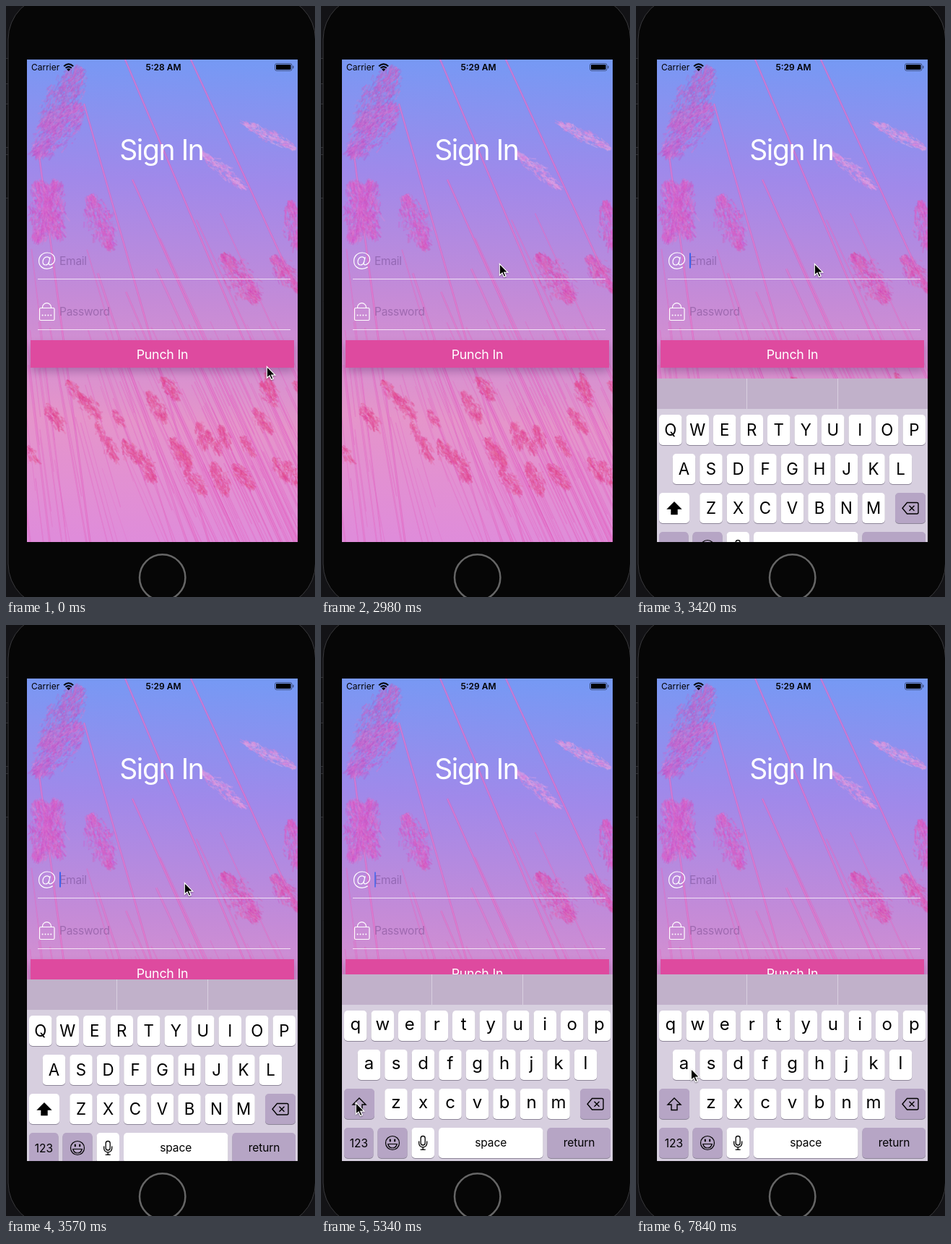
These frames come from a looping animation (428 by 817 pixels, 8 s). An HTML page with a canvas:

```html
<!DOCTYPE html>
<html lang="en">
<head>
<meta charset="utf-8">
<title>Sign In</title>
<style>
html, body { margin: 0; width: 100%; height: 100%; overflow: hidden; background: #060606; }
canvas { display: block; }
</style>
</head>
<body>
<canvas id="stage" width="428" height="817"></canvas>
<script>
const W = 428, H = 817, LOOP = 8000;
const SCREEN = { x: 29, y: 74, w: 375, h: 667 };
const stage = document.getElementById('stage').getContext('2d');
let ctx = stage;

let seed = 7;
const random = () => (seed = (seed * 16807) % 2147483647) / 2147483647;
const between = (a, b) => a + (b - a) * random();
const spread = r => (random() + random() - 1) * r;
const clamp = v => Math.max(0, Math.min(1, v));

function text(str, x, y, size, { weight = 400, color = '#000', align = 'left', spacing = 0 } = {}) {
  ctx.font = `${weight} ${size}px Inter, sans-serif`;
  ctx.letterSpacing = spacing + 'px';
  ctx.textAlign = align;
  ctx.fillStyle = color;
  ctx.fillText(str, x, y);
}

function box(x, y, w, h, r, fill) {
  ctx.beginPath();
  ctx.roundRect(x, y, w, h, r);
  ctx.fillStyle = fill;
  ctx.fill();
}

function line(path, color, width, fill) {
  const p = new Path2D(path);
  if (fill) { ctx.fillStyle = fill; ctx.fill(p); }
  ctx.strokeStyle = color;
  ctx.lineWidth = width;
  ctx.stroke(p);
}

function clipToScreen() {
  ctx.beginPath();
  ctx.rect(SCREEN.x, SCREEN.y, SCREEN.w, SCREEN.h);
  ctx.clip();
}

// Stems lean more the further right they start
function drawStem(x, y, length, width, alpha) {
  const lean = 0.12 + 0.34 * clamp((x - 40) / 140);
  const path = `M${x} ${y}L${x + length * lean} ${y + length}`;
  line(path, `rgba(221,88,186,${alpha})`, width);
  line(path, `rgba(238,150,220,${alpha})`, width * 0.35);
}

// A feathery head of soft hairs along an axis
function drawPlume(x, y, length, angle) {
  const pale = x > 260 && y < 260;
  const depth = clamp((y - 80) / 420);
  const hue = 290 + 40 * depth, sat = 50 + 22 * depth, light = pale ? 74 : 62;
  const width = length * (pale ? 0.13 : 0.3);
  const dx = Math.cos(angle), dy = Math.sin(angle);
  for (let i = 0; i < length * width / 3; i++) {
    const u = random();
    const side = spread(width) * (0.3 + 0.7 * Math.sin(Math.PI * u));
    const px = x + dx * length * u - dy * side, py = y + dy * length * u + dx * side;
    const reach = between(2, 8);
    const path = `M${px} ${py}l${dx * reach + spread(4)} ${dy * reach + spread(4)}`;
    line(path, `hsla(${hue + spread(10)},${sat}%,${light + spread(11)}%,.32)`, between(1, 2.6));
  }
}

function drawMeadow() {
  const { x, y, w, h } = SCREEN;
  const sky = ctx.createLinearGradient(x + w * 0.55, y, x + w * 0.45, y + h);
  ['#7699f4', '#a089ea', '#c58bd7', '#e595ca', '#df8cda'].forEach((c, i) => sky.addColorStop(i / 4, c));
  ctx.fillStyle = sky;
  ctx.fillRect(x, y, w, h);

  for (let i = 0; i < 150; i++) drawStem(between(-40, 390), between(430, 660), between(60, 280), between(0.6, 1.8), 0.36);
  for (let i = 0; i < 14; i++) drawStem(between(20, 310), between(270, 500), 480, between(1.5, 4), 0.4);
  for (const [sx, sy] of [[165, 74], [256, 74], [108, 135], [175, 240], [45, 200]]) drawStem(sx, sy, 670, 2.6, 0.55);

  // x, y, length, angle
  [
    [105, 84, 98, 2.1], [105, 135, 95, 2.3], [72, 240, 88, 1.9], [42, 240, 85, 1.2], [116, 260, 78, 1.2],
    [402, 198, 80, 3.6], [268, 200, 78, 0.7], [393, 268, 65, 1.4], [298, 342, 80, 0.92], [368, 345, 60, 0.9]
  ].forEach(p => drawPlume(...p));
  for (let i = 0; i < 26; i++) {
    drawPlume(x + w * (i * 0.618 % 1) ** 0.8, between(500, 650), between(24, 50), between(0.8, 1.3));
  }
}

function drawPhone() {
  ctx.fillStyle = '#131316';
  ctx.fillRect(0, 0, W, H);
  for (const [y, h] of [[72, 35], [135, 60], [205, 60]]) {
    box(-4, y, 9, h, 1, '#0d0d0f');
    line(`M0 ${y}.5H4M0 ${y + h}.5H4`, '#333336', 1);
  }
  box(3, -14, 425.5, 845, 60, '#060606');
  ctx.strokeStyle = '#39393c';
  ctx.lineWidth = 1;
  ctx.stroke();
  line('M185 790a31.7 31.7 0 1 0 63.4 0a31.7 31.7 0 1 0 -63.4 0', '#666', 2.5);
}

function drawStatusIcons() {
  line('M80.2 83.2Q86.7 77.4 93.2 83.2M82.6 85.8Q86.7 82.2 90.8 85.8', '#000', 2);
  line('M84.4 87.4Q86.7 85.6 89 87.4L86.7 90Z', '#000', 0.4, '#000');
  ctx.beginPath();
  ctx.roundRect(372.5, 79.5, 23.5, 10, 2.5);
  ctx.strokeStyle = 'rgba(0,0,0,.45)';
  ctx.lineWidth = 1;
  ctx.stroke();
  box(374, 81, 20.5, 7, 1, '#000');
  box(397, 82.5, 1.5, 4, 1, 'rgba(0,0,0,.45)');
}

function drawForm() {
  const white = '#fff', hint = { color: 'rgba(62,28,92,.3)', spacing: -0.25 };
  text('Carrier', 35, 88.5, 12);
  drawStatusIcons();
  text('Sign In', 215.3, 213, 39, { color: white, align: 'center', spacing: -1.4 });

  line('M61.2 347.2L59.4 354.6Q58.8 358 61.4 357.8C65 357.2 67.6 353.8 67.6 350.6C67.6 344.8 63 341 57.2 341C50.6 341 45.6 346 45.6 352.4C45.6 358.8 50.2 363.4 56.8 363.4Q61.4 363.4 64.8 360.8', white, 1.2);
  line('M60.7 350.2C60.2 347.8 58.6 346.8 56.8 346.8C53.4 346.8 51 350 51 353.6C51 356.4 52.4 358 54.6 358C57.2 358 59.2 355.8 59.8 353', white, 1.2);
  text('Email', 74, 357.5, 15.5, hint);
  line('M50.5 417.5V416.5a6 5.8 0 0 1 12 0V417.5M48 417.5H65.5Q67 417.5 67 419V433Q67 434.5 65.5 434.5H48Q46.5 434.5 46.5 433V419Q46.5 417.5 48 417.5Z', white, 1.2);
  for (let i = 0; i < 4; i++) box(49.6 + i * 3.9, 426.5, 2, 2, 1, white);
  text('Password', 74, 427.5, 15.5, hint);
  line('M44 377.5H394M44 447.5H394', 'rgba(255,255,255,.75)', 1);

  ctx.save();
  ctx.shadowColor = 'rgba(70,30,90,.3)';
  ctx.shadowBlur = 12;
  ctx.shadowOffsetY = 6;
  box(34, 462, 365, 38, 0, '#de4a9f');
  ctx.restore();
  text('Punch In', 216.5, 488.3, 17.8, { color: white, align: 'center', spacing: -0.2 });
}

function makeBackdrop() {
  const layer = document.createElement('canvas');
  layer.width = W;
  layer.height = H;
  ctx = layer.getContext('2d');
  drawPhone();
  ctx.save();
  clipToScreen();
  drawMeadow();
  drawForm();
  ctx.restore();
  ctx = stage;
  return layer;
}

function key(x, y, w, fill = '#fff') {
  box(x, y + 1, w, 42, 5, '#8d8598');
  box(x, y, w, 42, 5, fill);
}

// Drawn with its top edge at y = 0
function drawKeyboard(upper) {
  const gray = '#b6a5c5', center = { align: 'center' };
  ctx.fillStyle = '#d7cfdf';
  ctx.fillRect(29, 0, 375, 258);
  ctx.fillStyle = '#c1b1ca';
  ctx.fillRect(29, 0, 375, 42);
  line('M153.5 0V42M279.5 0V42', '#d9cfe0', 1);

  ['qwertyuiop', 'asdfghjkl', 'zxcvbnm'].forEach((row, r) => {
    const left = 216.5 - row.length * 18.75 + 3, y = 50 + 54 * r;
    [...row].forEach((letter, i) => {
      const x = left + 37.5 * i;
      key(x, y, 31.5);
      if (upper) text(letter.toUpperCase(), x + 15.75, y + 29.3, 22.3, center);
      else text(letter, x + 15.75, y + 27.3, 24, center);
    });
  });

  key(32, 158, 42, upper ? '#fff' : gray);
  line('M53 171L62 180H57V187.5H49V180H44Z', '#000', 1.4, upper && '#000');
  key(359, 158, 42, gray);
  line('M375.5 171.5H389Q391 171.5 391 173.5V185Q391 187 389 187H375.5L369 179.2ZM378.5 175.7L385.5 182.7M385.5 175.7L378.5 182.7', '#000', 1.4);

  key(32, 212, 40.5, gray);
  text('123', 52.3, 238.8, 15.5, center);
  key(78.5, 212, 41, gray);
  line('M89.5 233a9.5 9.5 0 1 0 19 0a9.5 9.5 0 1 0 -19 0M92.8 234.5H105.2Q104 240 99 240Q94 240 92.8 234.5Z', '#000', 1.2);
  box(94.8, 227.5, 2, 4, 1, '#000');
  box(101.2, 227.5, 2, 4, 1, '#000');
  key(125.5, 212, 31.5);
  line('M138.2 226.5a3 3 0 0 1 6 0V233a3 3 0 0 1 -6 0ZM135.7 230.5V233.5a5.5 5.5 0 0 0 11 0V230.5M141.2 239V242.3M137.7 242.3H144.7', '#000', 1.3);
  key(163, 212, 144.5);
  text('space', 235.2, 238, 15.5, { ...center, spacing: -0.1 });
  key(313.5, 212, 87.5, gray);
  text('return', 357.5, 238, 15.5, { ...center, spacing: -0.1 });
}

// start, end, x, y
const moves = [
  [292, 588, 324, 507], [1180, 2068, 254, 330], [2512, 2956, 247, 356], [4288, 4880, 95, 700],
  [4880, 5176, 48, 660], [5324, 6360, 236, 510], [7100, 7840, 76, 613]
];

function pointerAt(t) {
  let x = 361, y = 498;
  for (const [start, end, toX, toY] of moves) {
    const u = clamp((t - start) / (end - start));
    const ease = u * u * u * (u * (6 * u - 15) + 10);
    x += (toX - x) * ease;
    y += (toY - y) * ease;
  }
  return [x, y];
}

function drawPointer(x, y) {
  ctx.save();
  ctx.translate(Math.round(x), Math.round(y));
  ctx.shadowColor = 'rgba(0,0,0,.3)';
  ctx.shadowBlur = 2;
  ctx.shadowOffsetY = 1;
  line('M.5 .8V16L4.1 12.8L6.6 18.4L9 17.4L6.6 11.9H11.4Z', '#fff', 1.5, '#000');
  ctx.shadowColor = 'transparent';
  line('M1.2 2.5V14.3L4.4 11.5L7 17.2L7.8 16.8L5.3 11.2H9.8Z', '#000', 0.4, '#000');
  ctx.restore();
}

function caretAlpha(t) {
  const phase = (t - 2800) % 980;
  return phase < 450 ? clamp(1 - phase / 150) : clamp((phase - 450) / 150);
}

const backdrop = makeBackdrop();

function draw(time) {
  const t = 440 + Math.floor((time - 440) / 148) * 148;
  ctx.drawImage(backdrop, 0, 0);
  text(t > 2700 ? '5:29 AM' : '5:28 AM', 218, 88.5, 12, { weight: 600, align: 'center' });

  if (t > 3200) {
    ctx.fillStyle = `rgba(62,100,238,${caretAlpha(t)})`;
    ctx.fillRect(74, 341.5, 2, 21);
    const rise = 1 - Math.exp((3200 - t) / 96);
    ctx.save();
    clipToScreen();
    ctx.translate(0, Math.round(741 - 258 * rise));
    drawKeyboard(t < 5170);
    ctx.restore();
  }
  drawPointer(...pointerAt(t));
}

function tick() {
  draw(performance.now() % LOOP);
  requestAnimationFrame(tick);
}
tick();
</script>
</body>
</html>
```
